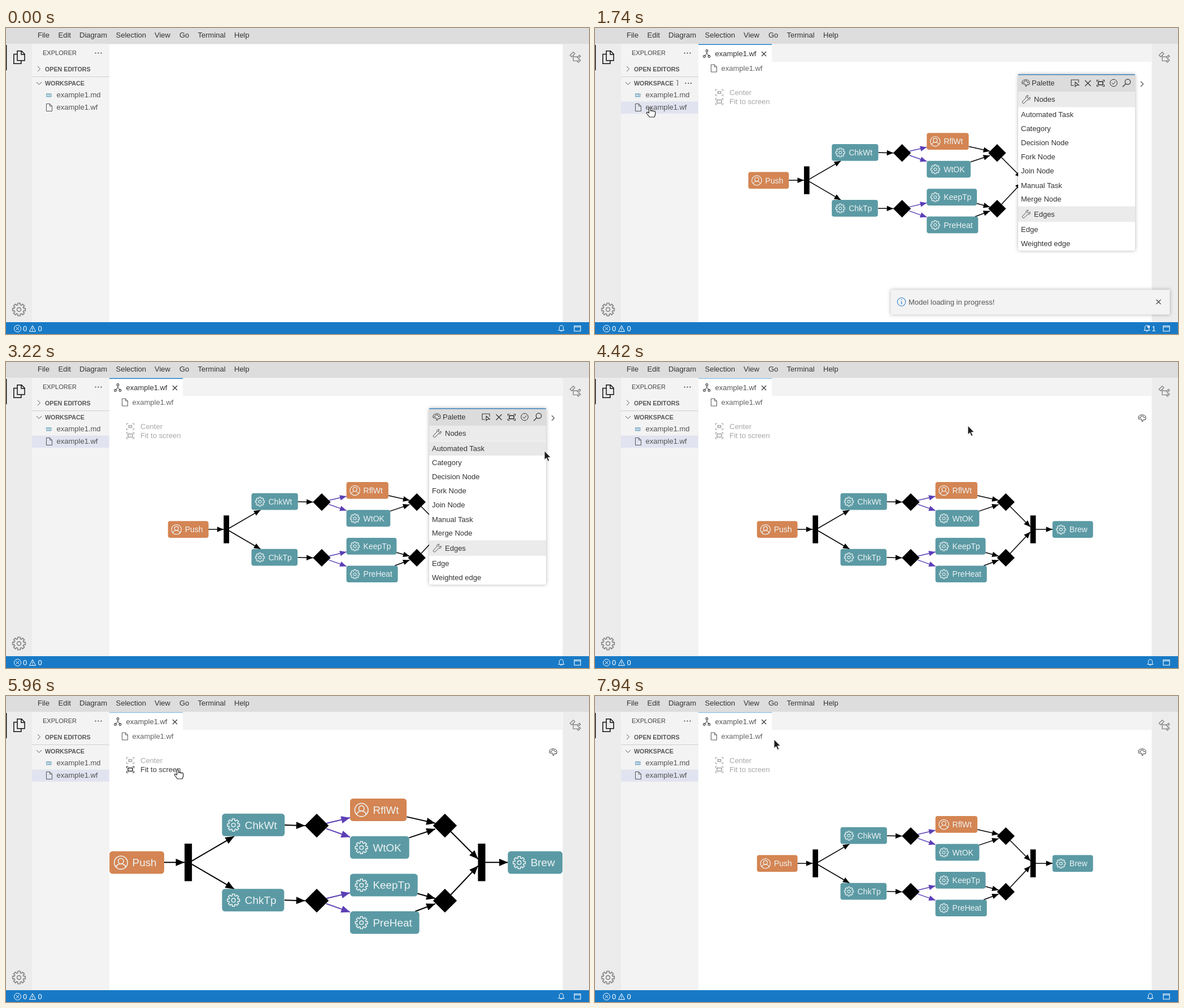
An HTML page that plays this animation: 1032 by 543 pixels, repeating every 8 s.

```html
<!DOCTYPE html>
<html lang="en">
<head>
<meta charset="utf-8">
<title>Workflow diagram editor</title>
<style>
html, body { margin: 0; width: 100%; height: 100%; overflow: hidden; background: #fff; }
svg { display: block; }
text { font: 13px "Liberation Sans", Arial, sans-serif; white-space: pre; }
.small { font-size: 11px; }
.head { font-size: 10.7px; font-weight: bold; }
.label { font-size: 14px; }
.shadow { filter: drop-shadow(0 0 3px rgba(0,0,0,.3)); }
</style>
</head>
<body>
<svg id="stage" width="1032" height="543" viewBox="0 0 1032 543"></svg>
<script>
const LOOP = 8000;
const ORANGE = '#d48553', TEAL = '#5b9aa4', PURPLE = '#5b3fb5', BLUE = '#187ac6';

// Drawing helpers, each returning SVG markup
const rect = (x, y, w, h, fill, more = '') => `<rect x="${x}" y="${y}" width="${w}" height="${h}" fill="${fill}" ${more}/>`;
const text = (x, y, s, fill = '#333', cls = '', more = '') => `<text x="${x}" y="${y}" fill="${fill}" class="${cls}" ${more}>${s}</text>`;
const line = (d, color = '#444', w = 1, more = '') => `<path d="${d}" fill="none" stroke="${color}" stroke-width="${w}" ${more}/>`;
const ring = (x, y, r, color = '#444', w = 1) => `<circle cx="${x}" cy="${y}" r="${r}" fill="none" stroke="${color}" stroke-width="${w}"/>`;
const dot = (x, y, r, fill) => `<circle cx="${x}" cy="${y}" r="${r}" fill="${fill}"/>`;
const group = (id, body, more = '') => `<g id="${id}" ${more}>${body}</g>`;
const cross = (x, y, r, color = '#444', w = 1.2) =>
  line(`M${x - r} ${y - r}l${2 * r} ${2 * r}m0 ${-2 * r}l${-2 * r} ${2 * r}`, color, w);

function gear(x, y, r, color, w) {
  const pts = [];
  for (let i = 0; i < 8; i++)
    for (const [off, k] of [[-.26, .74], [-.2, 1], [.2, 1], [.26, .74]]) {
      const a = i * Math.PI / 4 + off;
      pts.push(`${(x + r * k * Math.cos(a)).toFixed(2)} ${(y + r * k * Math.sin(a)).toFixed(2)}`);
    }
  return line(`M${pts.join('L')}z`, color, w, 'stroke-linejoin="round"') + ring(x, y, r * .3, color, w);
}

const person = (x, y, color) => ring(x, y, 8.7, color, 1.2) + ring(x, y - 2, 3.5, color, 1.2) +
  line(`M${x - 6} ${y + 6}c0-6 12-6 12 0`, color, 1.2);

const page = (x, y) => line(`M${x} ${y}h6l4 4v9h-10zM${x + 6} ${y}v4h4`, '#555');

const wrench = (x, y) => line(`M${x - 6} ${y + 3}l6-6c-1-3 2-5 4-4l-2 3 2 2 3-2c1 3-1 5-4 4l-6 6c-2 2-5-1-3-3z`, '#444', 1);

const paint = (x, y) => line(`M${x + 1} ${y + 6}c-2 0 0-3-2-4s-5 1-5-2c0-8 13-8 13 0 0 4-2 3-4 3s0 3-2 3z`, '#444', 1.1) +
  [[-3, -1], [-1, -3.5], [2, -3.5], [4, -1]].map(([a, b]) => dot(x + a, y + b, 1.1, '#444')).join('');

// Corner marks around a box, half width w
const frame = (x, y, w, h, color, inner) =>
  line(`M${x - w} ${y - h + 3}v-3h3M${x + w - 3} ${y - h}h3v3M${x + w} ${y + h - 3}v3h-3M${x - w + 3} ${y + h}h-3v-3`, color, 1.2) +
  `<rect x="${x - inner}" y="${y - inner * .7}" width="${inner * 2}" height="${inner * 1.4}" fill="none" stroke="${color}" stroke-width="1.6"/>`;

function node(x, y, w, name, manual) {
  const ink = '#edf3f4';
  return rect(x, y, w, 29.7, manual ? ORANGE : TEAL, 'rx="4"') +
    (manual ? person(x + 15, y + 15, ink) : gear(x + 15, y + 15, 8.2, ink, 1.1)) +
    text(x + 30, y + 20, name, ink, 'label');
}

function arrow(x1, y1, x2, y2, color = '#000') {
  const deg = Math.atan2(y2 - y1, x2 - x1) * 180 / Math.PI;
  return line(`M${x1} ${y1}L${x2} ${y2}`, color, 1.5) +
    `<path d="M0 0l-11.5-4.8v9.6z" fill="${color}" transform="translate(${x2} ${y2}) rotate(${deg})"/>`;
}

const diamond = (x, y) => `<path d="M${x - 15.7} ${y}l15.7-15.7 15.7 15.7-15.7 15.7z"/>`;

function diagram() {
  let s = arrow(358, 297, 385.3, 297) + arrow(395, 295, 450.5, 262.6) + arrow(395, 299.5, 450.5, 332) +
    arrow(780, 297, 810, 297) + arrow(735, 256.5, 770.7, 292.5) + arrow(735, 339.5, 770.7, 301.5) +
    arrow(677, 237, 714.5, 245.5) + arrow(680, 264.6, 714.5, 253) +
    arrow(691, 338, 714.5, 344.5) + arrow(688, 361.5, 714.5, 351.5);
  for (const y of [248.6, 347.4]) {
    s += arrow(516.5, y - .7, 543.5, y) + arrow(571.5, y - 3, 602.6, y - 10.4, PURPLE) +
      arrow(571.5, y + 4, 602.6, y + 15, PURPLE) + diamond(558.9, y) + diamond(727.2, y);
  }
  return s + rect(385.3, 272.3, 9.7, 49.4, '#000') + rect(770.6, 272.3, 9.7, 49.4, '#000') +
    node(286.7, 282.3, 71.8, 'Push', true) + node(434.5, 232.8, 82.3, 'ChkWt') + node(434.5, 331.8, 81.6, 'ChkTp') +
    node(602.6, 213, 74.3, 'RflWt', true) + node(602.6, 262.5, 77.7, 'WtOK') +
    node(602.6, 312, 88.8, 'KeepTp') + node(602.6, 361.4, 91, 'PreHeat') + node(809.8, 282.3, 71.8, 'Brew');
}

const rows = [['Automated Task', 141], ['Category', 166], ['Decision Node', 191], ['Fork Node', 216],
  ['Join Node', 241], ['Manual Task', 266.5], ['Merge Node', 291], ['Edge', 344.5], ['Weighted edge', 370]];

function palette() {
  const header = (y, name) => rect(749, y, 207, 27.5, '#ebebeb') + wrench(763, y + 14) + text(777, y + 18, name);
  return `<g class="shadow">${rect(749, 82, 207, 313, '#fff', 'rx="3"')}</g>` +
    rect(749, 82, 207, 31, '#dcdcdc') + rect(749, 82, 207, 1.5, '#3f86bf') +
    header(113, 'Nodes') + header(316.5, 'Edges') +
    rect(749, 141, 207, 25, '#e8e8e8', 'id="hover"') +
    rows.map(([name, y]) => text(754, y + 17, name)).join('') +
    paint(762, 97.5) + text(773, 102, 'Palette') +
    line('M848 102h-5v-10h13v5M850 96v8l2.5-2.5 4 0z', '#333', 1.1) + cross(872.5, 98, 5, '#333') +
    frame(895, 98, 6.5, 5.5, '#333', 4) + ring(918, 97.5, 6.3, '#333') + line('M915 97.5l2.3 2.5 4-5', '#333') +
    ring(943, 95.5, 4.7, '#333', 1.2) + line('M939.5 99l-5.5 5.5', '#333', 1.3);
}

const option = (id, y, name, inner) =>
  group(id, frame(220, y, 6.5, 5.5, 'currentColor', inner) + text(238, y + 4.7, name, 'currentColor'));

const shell = () => rect(0, 0, 1032, 543, '#fff') + rect(0, 0, 1032, 28.5, '#ddd') +
  [['File', 56], ['Edit', 92.5], ['Diagram', 130], ['Selection', 194.5], ['View', 263], ['Go', 307], ['Terminal', 339.5], ['Help', 404]]
    .map(([name, x]) => text(x, 17, name)).join('') +
  rect(0, 28.5, 46, 494, '#ececec') + rect(46, 28.5, 137, 494, '#f3f3f3') + rect(985.5, 28.5, 47, 494, '#ececec') +
  rect(0, 30, 1.3, 45, '#000', 'id="bar"') +
  line('M20 40.7h7.5l5.5 5.5v11.5h-13zM27 41v6h6M20 46.5h-6.2v16.7h13v-5', '#111', 1.5) +
  gear(23, 499.5, 11.5, '#888', 1.7) +
  `<g transform="translate(996.5 40.5) scale(1.43)">${line('M5.35 1.5l2 2-4 4-2-2zM13 5.5l1.3 1.3-2.6 2.6-1.3-1.3zM13 10.5l1.3 1.3-2.6 2.6-1.3-1.3zM5.35 5.5v7h5M5.35 7.4h5.5', '#888')}</g>` +
  text(65, 48, 'EXPLORER', '#444', 'small') + [158.5, 163.5, 168.5].map(x => dot(x, 44.5, 1.1, '#444')).join('') +
  line('M56 68l4.5 4.5-4.5 4.5M54 96l4.5 4.5 4.5-4.5', '#555') +
  text(69, 77, 'OPEN EDITORS', '#555', 'head') + rect(46, 86, 137, 1, '#d0d0d0') + text(69, 101.5, 'WORKSPACE', '#555', 'head') +
  rect(46, 130.5, 136.5, 21.5, '#e1e3f0', 'id="row"') +
  group('tools', line('M144 93h2.5v8.500h-1.500', '#555') + [160.5, 165.5, 170].map(x => dot(x, 98, 1.1, '#444')).join('')) +
  rect(71, 116, 9.5, 6.5, '#86b3c8') + line('M73 121v-3l1.500 2 1.500-2v3M78.500 117.500v3', '#fff', .9) +
  text(89.5, 123, 'example1.md', '#555') + page(71.5, 134.5) + text(89.5, 145, 'example1.wf', '#555');

const editor = () => rect(183, 28.5, 802.5, 31.5, '#f3f3f3') + rect(183, 28.5, 130, 31.5, '#fff') +
  rect(183, 28.5, 130, 1.5, BLUE, 'id="accent"') +
  line('M198 42v3l-4 5M198 45l4 5', '#333') + [[198, 40.5], [193.5, 50.5], [202, 50.5]].map(([x, y]) => ring(x, y, 1.9, '#333', 1.1)).join('') +
  text(212.5, 49.5, 'example1.wf', '#333', '', 'id="title"') + cross(299, 46, 4, '#333') +
  page(205.5, 65) + text(223.5, 76, 'example1.wf', '#666');

const notice = () => `<g class="shadow">${rect(523.5, 464.5, 494, 44, '#f3f3f3')}</g>` +
  ring(542.5, 486, 7.3, '#3b86d0', 1.1) + line('M542.500 485v5M542.500 481.500v1.500', '#3b86d0', 1.4) +
  text(555, 490.5, 'Model loading in progress!', '#555') + cross(997.5, 486, 4, '#444');

const status = () => rect(0, 522, 1032, 21, BLUE) +
  ring(20.5, 533.5, 6, '#fff') + cross(20.5, 533.5, 2.5, '#fff', 1) + text(30, 538, '0', '#fff') +
  line('M47 528l5.500 10.500h-11zM47 531.500v4M47 536.300v1.200', '#fff') + text(56.5, 538, '0', '#fff') +
  group('bell', line('M978 536.500l1.500-2v-3c0-5 7-5 7 0v3l1.500 2zM981.500 537c0 2 3 2 3 0', '#fff')) +
  group('count', dot(980, 530, 2.3, '#fff') + text(985.5, 538, '1', '#fff')) +
  line('M1006 528.500h11v9.500h-11zM1006 530.500h11', '#fff', 1.1);

const cursors = () =>
  '<path id="arrow" d="M0 0v16l3.600-3.400 2.600 5.900 2.600-1.100-2.600-5.800h5z" fill="#1c1c1c" stroke="#fff" stroke-width=".9"/>' +
  '<path id="hand" d="M-1.500 9v-8c0-2 3-2 3 0v4.500c0-1.600 2.800-1.500 2.800.3 0-1.500 2.700-1.400 2.700.4 0-1.400 2.700-1.300 2.700.6v4.700l-1.700 4.500h-8.500l-5-6.500c-1-2 1.500-2.600 2.500-1.500z" fill="#fff" stroke="#222" stroke-width="1.200" stroke-linejoin="round"/>';

document.getElementById('stage').innerHTML =
  '<clipPath id="canvas"><rect x="183" y="82" width="802.5" height="440"/></clipPath>' +
  '<clipPath id="fold"><rect id="foldBox" x="740" y="76" width="226" height="325"/></clipPath>' +
  shell() + group('editor', editor()) +
  group('model', `<g clip-path="url(#canvas)">${group('view', diagram())}</g>` +
    option('center', 114.5, 'Center', 2.6) + option('fit', 130.5, 'Fit to screen', 4) +
    group('panel', palette(), 'clip-path="url(#fold)"') +
    group('chevron', line('M966 95l4.500 4.500-4.500 4.500', '#444', 1.1)) + group('paint', paint(968, 99.5))) +
  status() + group('notice', notice()) + group('cursor', cursors());

const el = id => document.getElementById(id);
const set = (id, attr, value) => el(id).setAttribute(attr, value);
const show = (id, on) => { el(id).style.display = on ? '' : 'none'; };
const ramp = (t, a, b) => Math.min(1, Math.max(0, (t - a) / (b - a)));
const ease = x => x < .5 ? 2 * x * x : 1 - 2 * (1 - x) ** 2;

// Pointer stops: time, x, y
const paths = [
  [[500, 12, 219], [920, 98, 149], [1040, 98, 149], [1140, 97, 142], [2300, 97, 142], [2560, 203, 364]],
  [[2760, 858, 530], [3220, 953, 158], [3400, 971, 105], [4200, 971, 105], [4420, 660, 113], [4520, 660, 113],
   [4660, 402, 143], [4760, 402, 143], [5100, 302, 132], [5940, 302, 132], [5960, 304, 131], [6340, 304, 131],
   [6700, 257, 112], [7600, 257, 112], [7940, 317, 77], [8000, 317, 77]]
];

function pointer(t) {
  const path = paths.find(p => t >= p[0][0] && t < p[p.length - 1][0]);
  if (!path) return null;
  const i = path.findIndex(p => p[0] > t);
  const [t0, x0, y0] = path[i - 1], [t1, x1, y1] = path[i], p = (t - t0) / (t1 - t0);
  return [x0 + (x1 - x0) * p, y0 + (y1 - y0) * p];
}

// Scroll moves linearly and zoom exponentially, so the centre drifts in between
function viewport(t) {
  const FIT = 1.348, back = t >= 7040;
  const start = back ? 7040 : 5400;
  const p = ease(ramp(t, start, start + 300));
  const [z0, z1] = back ? [FIT, 1] : [1, FIT];
  const zoom = z0 * (z1 / z0) ** p;
  const drift = zoom * ((1 - p) / z0 + p / z1);
  const load = 1 - ease(ramp(t, 1600, 1900));
  const x = 183 + 401.2 * drift - 27.5 * load, y = 82 + 220 * drift - 48 * load;
  return `translate(${x} ${y}) scale(${zoom}) translate(-584.2 -302)`;
}

function draw(t) {
  const [x, y] = pointer(t) || [-99, -99];
  const within = (x0, y0, x1, y1) => x >= x0 && x < x1 && y >= y0 && y < y1;
  const opened = t >= 1440, loaded = t >= 1600, noticed = t >= 1480 && t < 1860, folded = t >= 3660;

  show('bar', t < 1300 || opened);
  show('row', opened);
  show('tools', within(46, 60, 183, 522));
  show('editor', opened);
  show('model', loaded);
  show('notice', noticed);
  show('count', noticed);
  set('bell', 'transform', `translate(${noticed ? -6 : 0} 0)`);
  set('accent', 'fill', folded ? '#8fbfe6' : BLUE);
  set('title', 'fill', folded ? '#555' : '#333');
  set('view', 'transform', viewport(t));

  const fold = ramp(t, 3640, 3980);
  set('foldBox', 'height', 325 * (1 - fold));
  show('panel', fold < 1);
  show('chevron', !folded);
  show('paint', folded);
  const over = !folded && within(749, 0, 956, 400) && rows.find(r => y >= r[1] && y < r[1] + 25);
  show('hover', over);
  if (over) set('hover', 'y', over[1]);

  const onCenter = within(211, 107, 309, 122.5), onFit = within(211, 122.5, 309, 139);
  set('center', 'color', onCenter ? '#3c3c3c' : '#a8a8a8');
  set('fit', 'color', onFit ? '#3c3c3c' : '#a8a8a8');

  const hand = onCenter || onFit || within(46, 130, 183, 147) || within(957, 90, 980, 112);
  show('cursor', x > 0);
  show('hand', hand);
  show('arrow', !hand);
  set('cursor', 'transform', `translate(${x} ${y})`);
}

const begin = performance.now();
function tick() {
  draw((performance.now() - begin) % LOOP);
  requestAnimationFrame(tick);
}
tick();
</script>
</body>
</html>
```
